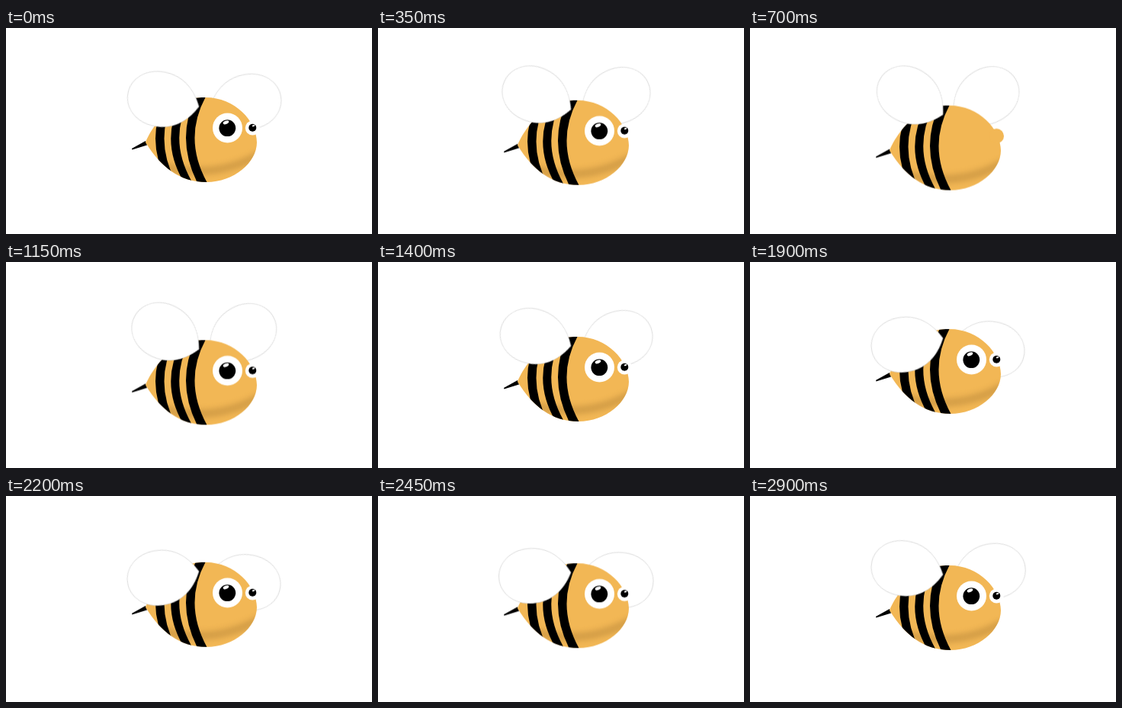
An HTML page that plays this animation: 480x270 px, repeating every 2.95 s.

```html
<!DOCTYPE html>
<html lang="en">
<head>
<meta charset="utf-8">
<title>Flying bee</title>
<style>
  html, body { margin: 0; width: 100%; height: 100%; overflow: hidden; background: #fff; }
  svg { display: block; width: 100vw; height: 100vh; }

  .bee, .wing, .eyes, .lids {
    animation: 2950ms cubic-bezier(.37, 0, .63, 1) infinite;
  }
  .bee { animation-name: bob; }
  /* Both wings start part way through the upstroke. */
  .wing { transform-origin: 0 0; animation-name: flap; animation-delay: -2030ms; }
  .near { --up: 31deg; --down: -10.3deg; }
  .far { --up: 32.5deg; --down: -14.8deg; }
  .eyes, .lids { animation-timing-function: step-end; }
  .eyes { animation-name: hide; }
  .lids { animation-name: show; }

  @keyframes bob {
    0%, 100% { transform: translateY(0); }
    32.2% { transform: translateY(12.6px); }
    71.2% { transform: translateY(-4.3px); }
  }
  @keyframes flap {
    0%, 100% { transform: rotate(var(--up)); }
    36.95% { transform: rotate(var(--down)); }
  }
  @keyframes hide {
    0%, 28.7%, 100% { opacity: 1; }
    21.9% { opacity: 0; }
  }
  @keyframes show {
    0%, 28.7%, 100% { opacity: 0; }
    21.9% { opacity: 1; }
  }
</style>
</head>
<body>
<svg viewBox="0 0 480 270" xmlns="http://www.w3.org/2000/svg">
  <defs>
    <path id="body" d="M183 150C190 132 206 112 222 102C236 93 248 91 262 91C300 91 329 122 329 150C329 176 299 202 263 202C228 202 203 182 183 150Z"/>
    <clipPath id="inside"><use href="#body"/></clipPath>
    <path id="wing" d="M0 0C-12 -24 -30 -36 -53 -36C-77 -36 -94.7 -20 -94.7 0C-94.7 20 -77 36 -53 36C-30 36 -12 24 0 0Z"
      fill="#fff" stroke="#c4c4c4" stroke-width=".6"/>
    <filter id="soft" x="-30%" y="-100%" width="160%" height="300%">
      <feGaussianBlur stdDeviation="3"/>
    </filter>
  </defs>

  <g class="bee">
    <g transform="translate(267 105) scale(-1 1)">
      <use class="wing far" href="#wing"/>
    </g>

    <path d="M165 158L183 148L185 153.5L165.5 159.5Z"/>
    <use href="#body" fill="#f2b755"/>
    <g clip-path="url(#inside)">
      <path d="M193 178Q268 202 332 166" fill="none" stroke="#c08d3e" stroke-width="11" opacity=".55" filter="url(#soft)"/>
      <path d="M262 90Q232 145 264 203L251 203Q222 145 249 90Z"/>
      <path d="M242 90Q212 145 243 200L232 200Q200.5 145 232 90Z"/>
      <path d="M222 90Q193 145 222 200L211 200Q181 145 211 90Z"/>
    </g>

    <g class="eyes" fill="#fff">
      <circle cx="290.5" cy="131" r="19.5"/>
      <circle cx="323.3" cy="131" r="9.5"/>
      <g fill="#000">
        <circle cx="290.3" cy="131.2" r="10.9"/>
        <circle cx="323.3" cy="130.8" r="5"/>
      </g>
      <ellipse cx="288.5" cy="123.8" rx="4" ry="2.1" transform="rotate(-22 288.5 123.8)"/>
      <ellipse cx="324.6" cy="128" rx="1.8" ry="1.2" transform="rotate(-22 324.6 128)"/>
    </g>
    <circle class="lids" cx="323.3" cy="131" r="9.7" fill="#f2b755"/>

    <g transform="translate(253 103)">
      <use class="wing near" href="#wing"/>
    </g>
  </g>
</svg>
</body>
</html>
```
